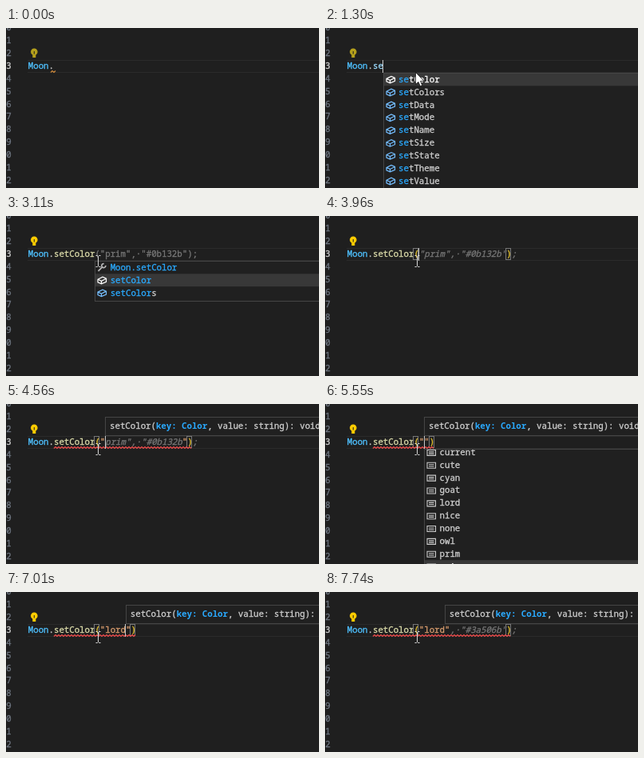
Recreate the animation shown at these times as an HTML page with a canvas. Size 392 px wide and 200 px high, loop 8000 ms.

```html
<!DOCTYPE html>
<html>
<head>
<meta charset="utf-8">
<style>
html, body { margin: 0; width: 100%; height: 100%; overflow: hidden; background: #1f1f1f; }
canvas { display: block; width: 392px; height: 200px; }
</style>
</head>
<body>
<canvas id="c" width="392" height="200"></canvas>
<script>
const g = document.getElementById('c').getContext('2d');
const LOOP = 8000, W = 6.43, H = 15.86, X0 = 27.8, BASE = 51, POP = 56;
const BLUE = '#2aaaff', TEXT = '#d0d0d0', GHOST = '#777777', GOLD = '#f0cc30', STR = '#d69a6c';
const FONT = '10.72px "Noto Sans Mono", "DejaVu Sans Mono", monospace';

const colX = n => X0 + n * W;
// Latest value in a list of [time, value] pairs
const at = (t, steps) => steps.reduce((v, s) => t >= s[0] ? s[1] : v, steps[0][1]);
const within = (t, a, b) => t >= a && t < b;

function rect(x, y, w, h, color) {
  g.fillStyle = color;
  g.fillRect(x, y, w, h);
}

function frame(x, y, w, h, color) {
  g.strokeStyle = color;
  g.lineWidth = 1;
  g.strokeRect(x + .5, y + .5, w, h);
}

function stroke(path, color, width = 1, x = 0, y = 0) {
  g.save();
  g.translate(x, y);
  g.strokeStyle = color;
  g.lineWidth = width;
  g.stroke(new Path2D(path));
  g.restore();
}

// Runs are [text, color, style]; a hairline outline gives the text its weight.
// Returns the x where the text ends.
function write(x, y, ...runs) {
  g.lineWidth = .3;
  for (const [text, color, style = ''] of runs) {
    g.font = style + ' ' + FONT;
    g.fillStyle = g.strokeStyle = color;
    g.fillText(text, x, y);
    if (style !== 'bold') g.strokeText(text, x, y);
    x += text.length * W;
  }
  return x;
}

function squiggle(from, to, color) {
  let d = `M${from} 55.5`;
  for (let x = from + 2, up = true; x <= to; x += 2, up = !up) d += `L${x} ${up ? 53.5 : 55.5}`;
  stroke(d, color, 1.2);
}

function bulb(color) {
  g.fillStyle = color;
  g.beginPath();
  g.arc(35.3, 29.8, 4.3, 0, 7);
  g.fill();
  rect(33.3, 32.5, 4, 4.5, color);
  rect(34.8, 29, 1, 3.5, '#1f1f1f');
}

const icons = {
  wrench(x, y, lit) {
    stroke('M-4.5 4.5L1 -1M2.6 -4.8A2.5 2.5 0 1 0 4.8 -2.6', lit ? '#ffffff' : '#b8b8b8', 1.7, x, y);
  },
  cube(x, y, lit) {
    stroke('M-5 -1L1 -4L5.5 -2L5.5 2L-.5 4.5L-5 2.5ZM-5 -1L-.5 1L5.5 -2M-.5 1L-.5 4.5',
      lit ? '#ffffff' : '#75beff', 1.2, x, y);
  },
  member(x, y) {
    stroke('M-5 -3.5H5.5V3.5H-5ZM-3 -1H3.5M-3 1.2H3.5', '#cccccc', 1.1, x, y + .5);
  }
};

// Items are [icon, label, number of matched letters]
function popup(left, items, selected, scroll, height) {
  const x = Math.round(left);
  g.save();
  g.beginPath();
  g.rect(x, POP, 400, height);
  g.clip();
  rect(x, POP, 400, height, '#202020');
  items.forEach(([icon, label, hit], i) => {
    const top = POP + .4 + i * H - scroll, lit = i === selected;
    if (lit) rect(x, top, 400, H, '#383838');
    icons[icon](x + 9, top + 8, lit);
    write(left + 19.3, top + 11.4,
      [label.slice(0, hit), BLUE],
      [label.slice(hit), lit ? '#ffffff' : TEXT, lit && icon === 'member' ? 'bold' : '']);
  });
  g.restore();
  frame(x, POP, 400, height - 1, '#454545');
}

function signature(left) {
  const x = Math.round(left);
  rect(x, 16, 400, 24, '#202020');
  frame(x, 16, 400, 23, '#454545');
  write(left + 5.8, 30.5, ['setColor(', TEXT], ['key: Color', BLUE, 'bold'], [', value: string): void', TEXT]);
}

const bracketBox = col => frame(Math.round(colX(col)) - 1, 40, 6, 14, '#777777');

const setters = ['Color', 'Colors', 'Data', 'Mode', 'Name', 'Size', 'State', 'Theme', 'Value', 'Width'];
const keys = ['back', 'base', 'blue', 'current', 'cute', 'cyan', 'goat', 'lord', 'nice', 'none', 'owl', 'prim', 'prin']
  .map(k => ['member', k, 0]);

function suggestions(t, word, caretX) {
  if (within(t, 1240, 3300)) {
    const n = word.length;
    if (n < 4) return popup(caretX, setters.map(s => ['cube', 'set' + s, n]), 0, 0, 160);
    const call = 'Moon.' + word;
    popup(caretX, [['wrench', call, call.length], ['cube', 'setColor', n], ['cube', 'setColors', n]],
      t < 3110 ? 0 : 1, 0, 51);
  }
  if (within(t, 4630, 7010)) {
    const sel = at(t, [[0, 0], [5550, 12], [5810, 11], [6010, 10], [6090, 9], [6290, 8], [6550, 7]]);
    popup(caretX, keys, sel, t < 5550 ? 0 : 3 * H + 4, 160);
  }
}

function codeLine(t, word) {
  const full = word === 'setColor';
  const x = write(X0, BASE, ['Moon', '#4fc1ff'], ['.', TEXT], [word, full ? '#dcdcaa' : '#9cdcfe']);
  const ghost = s => [s, GHOST, 'italic'];
  if (within(t, 3110, 3960)) write(x, BASE, ['("prim",·"#0b132b");', GHOST]);
  if (t < 3960) return;

  let inner;
  if (t < 4480) inner = [ghost('"prim",·"#0b132b"')];
  else if (t < 4630) inner = [['"', STR], ghost('prim",·"#0b132b'), ['"', STR]];
  else if (t < 7010) inner = [['""', STR]];
  else inner = [['"lord"', STR], ...(t < 7740 ? [] : [ghost(',·"#3a506b"')])];
  const close = 14 + inner.reduce((n, r) => n + r[0].length, 0);
  const tail = t < 4630 || t >= 7740 ? [ghost(';')] : [];
  bracketBox(13);
  bracketBox(close);
  write(x, BASE, ['(', GOLD], ...inner, [')', GOLD], ...tail);
  if (t >= 4480) squiggle(60, colX(close + 1), '#f14c4c');
}

function mouse(t) {
  if (t < 70) return;
  const p = Math.min(1, (t - 70) / 750), q = 1 - p;
  const x = 316 * q * q + 300 * p * q + 115.5 * p * p;
  const y = 187 * q * q + 56 * p * p;
  if (within(t, 1240, 2600)) {
    const arrow = 'M0 0V15L3.4 11.8L5.8 17.2L8.2 16L5.9 10.9H10.6Z';
    g.save();
    g.translate(113.5, 55.5);
    g.fillStyle = '#ffffff';
    g.fill(new Path2D(arrow));
    g.restore();
    stroke(arrow, '#000000', .7, 113.5, 55.5);
  } else {
    stroke('M-3 -7H-1L0 -6L1 -7H3M0 -6V6M-3 7H-1L0 6L1 7H3', '#d8d8d8', 1, Math.round(x) - .5, Math.round(y) + .5);
  }
}

function draw(t) {
  rect(0, 0, 392, 200, '#1f1f1f');
  rect(27, 40, 365, 1, '#2b2b2b');
  rect(27, 55, 365, 1, '#2b2b2b');
  for (let n = 80; n <= 92; n++)
    write(6.8 - 2 * W, BASE + (n - 83) * H, [String(n), n === 83 ? TEXT : '#6e7681']);

  const word = at(t, [[0, ''], [1160, 's'], [1300, 'se'], [1430, 'set'], [1830, 'setC'],
    [2090, 'setCo'], [2230, 'setCol'], [2410, 'setColo'], [2600, 'setColor']]);
  const col = at(t, [[0, 5 + word.length], [3960, 14], [4480, 15], [7010, 19]]);
  const caretX = colX(col);

  if (t < 2090) bulb('#b5a01c');
  else if (t >= 2800) bulb('#ffcc00');
  codeLine(t, word);
  if (t < 1160) squiggle(56, 62, '#d08a3c');
  if (within(t, 1830, 2800)) squiggle(60, 80, '#55555f');

  if (t >= 4090) signature(caretX);
  suggestions(t, word, caretX);
  const shown = [[330, 820], [1160, 2970], [3500, 5090], [5550, 6010], [6550, 7540]];
  if (shown.some(([a, b]) => within(t, a, b))) rect(Math.floor(caretX), 40, 1, 16, '#c8c8c8');
  mouse(t);
}

const start = performance.now();
function tick() {
  draw((performance.now() - start) % LOOP);
  requestAnimationFrame(tick);
}
tick();
</script>
</body>
</html>
```
